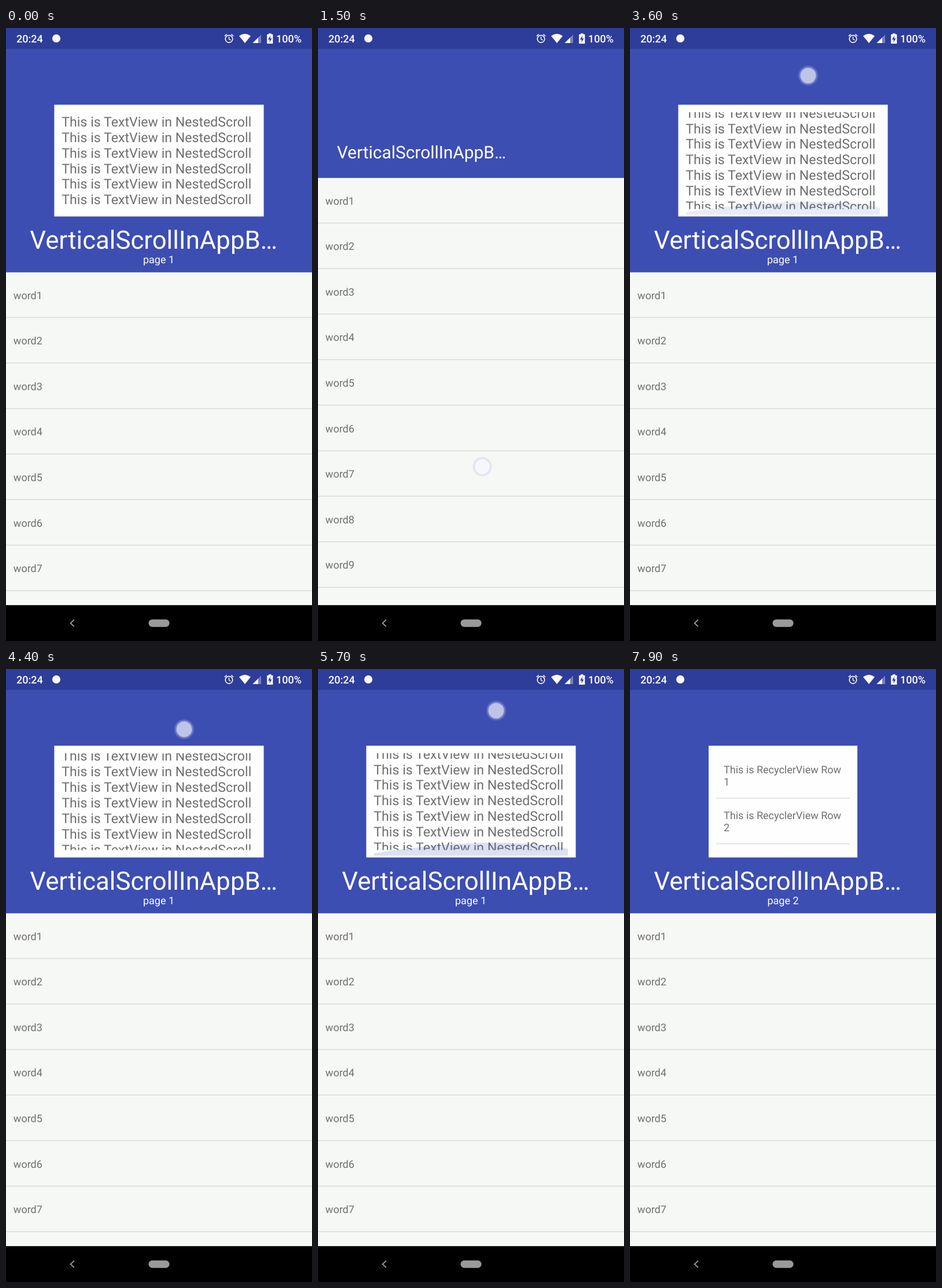
These frames come from a looping animation (529x1058 px, 8000 ms). An HTML page with a canvas:

```html
<!DOCTYPE html>
<html lang="en">
<head>
<meta charset="utf-8">
<title>Vertical scroll in app bar</title>
<style>
  html, body { margin: 0; width: 100%; height: 100%; overflow: hidden; background: #000; }
  canvas { display: block; width: 529px; height: 1058px; }
</style>
</head>
<body>
<canvas id="stage"></canvas>
<script>
const W = 529, H = 1058, LOOP = 8000, STEP = 100, TAU = 2 * Math.PI;
const DP = W / 411.43;
const STATUS = 28 * DP, HEADER = 328 * DP, RANGE = 244 * DP, NAV = H - 48 * DP;
const ROW = 78.6, LINE = 26.94, MAX_SCROLL = 95.9;
const CARD_TOP = STATUS + 75 * DP, CARD_H = 150 * DP, PAD = 10 * DP;
const BLUE = '#3c4eb2', DARK = '#2e3d99', PAPER = '#f6f8f5', CARD = '#fdfefd';
const GREY = '#6e7070', RULE = '#d6d9d6';

const canvas = document.getElementById('stage');
const ctx = canvas.getContext('2d');
const dpr = window.devicePixelRatio || 1;
canvas.width = W * dpr;
canvas.height = H * dpr;

const clamp = (v, lo = 0, hi = 1) => Math.max(lo, Math.min(hi, v));
const ramp = (t, from, to) => clamp((t - from) / (to - from));
const easeOut = x => 1 - (1 - x) ** 2;
const smooth = x => x * x * (3 - 2 * x);

// The header collapses under one drag up and opens again with a drag down.
const headerShift = t => RANGE * (smooth(ramp(t, 400, 1000)) - easeOut(ramp(t, 1400, 1758)));
const scrimAlpha = t => ramp(t, 800, 1200) - ramp(t, 1500, 2100);
const pageShift = t => W * easeOut(ramp(t, 7000, 7850));

// The finger swings up and down over the card, then swipes to the left.
function finger(t) {
  const swing = 180 - 123 * Math.cos(TAU * (t - 4553) / 1063);
  const x = 308 + 157 * smooth(ramp(t, 6300, 6900)) - 325 * smooth(ramp(t, 7000, 7350));
  return { x, y: t < 6335 ? swing : 237 };
}

function rect(x, y, w, h, color) {
  ctx.fillStyle = color;
  ctx.fillRect(x, y, w, h);
}

function disc(x, y, r, color) {
  ctx.fillStyle = color;
  ctx.beginPath();
  ctx.arc(x, y, r, 0, TAU);
  ctx.fill();
}

function poly(points, color) {
  ctx.fillStyle = color;
  ctx.beginPath();
  points.forEach(([x, y]) => ctx.lineTo(x, y));
  ctx.fill();
}

function stroke(points, color, width) {
  ctx.strokeStyle = color;
  ctx.lineWidth = width;
  ctx.beginPath();
  points.forEach(([x, y]) => ctx.lineTo(x, y));
  ctx.stroke();
}

function text(str, x, y, size, color, align = 'left', weight = 400) {
  ctx.font = `${weight} ${size}px Roboto, sans-serif`;
  ctx.textAlign = align;
  ctx.fillStyle = color;
  ctx.fillText(str, x, y);
}

function card(width) {
  rect((W - width) / 2, CARD_TOP, width, CARD_H, CARD);
}

function glow(alpha, base, left, mid, right) {
  ctx.fillStyle = `rgba(63,81,181,${0.17 * clamp(alpha)})`;
  ctx.beginPath();
  ctx.moveTo(97, base);
  ctx.lineTo(97, left);
  ctx.quadraticCurveTo(300, mid, 432, right);
  ctx.lineTo(432, base);
  ctx.fill();
}

function textPage(t) {
  const pull = t < 2900 ? 0 : 196 - finger(t).y;
  const scroll = clamp(pull, 0, MAX_SCROLL);
  const top = CARD_TOP + PAD;
  card(362.2);
  ctx.save();
  ctx.beginPath();
  ctx.rect(96, top, 337, CARD_H - 2 * PAD);
  ctx.clip();
  for (let i = 0; i < 11; i++) {
    text('This is TextView in NestedScroll', 96.3, top + 24.4 + i * LINE - scroll, 18 * DP, GREY);
  }
  ctx.restore();
  glow((pull - MAX_SCROLL) / 28, 322, 318, 286, 310);
  glow(-pull / 100, 144.5, 149, 154, 149);
  text('page 1', W / 2 - 0.5, 406.3, 18, '#fff', 'center');
}

function rowsPage() {
  card(257.2);
  for (let i = 0; i < 2; i++) {
    const y = CARD_TOP + PAD + i * ROW;
    text('This is RecyclerView Row', 162, y + 35, 18, GREY);
    text(i + 1, 162, y + 56, 18, GREY);
    rect(149, y + 77, 231, 1.5, '#dcdedc');
  }
  text('page 2', W / 2, 406.3, 18, '#fff', 'center');
}

function header(t, shift) {
  const bottom = HEADER - shift, page = pageShift(t);
  rect(0, 0, W, bottom, BLUE);
  ctx.save();
  ctx.translate(-page, -shift);
  if (page < W) textPage(t);
  ctx.translate(W, 0);
  if (page > 0) rowsPage();
  ctx.restore();

  ctx.globalAlpha = scrimAlpha(t);
  rect(0, 0, W, bottom, BLUE);
  ctx.globalAlpha = 1;

  const f = shift / RANGE;
  const size = (34 - 14 * easeOut(f)) * DP;
  text('VerticalScrollInAppB…', 41.3 - 16.5 * f, 381 - 300 * f, size, '#fff');
}

function list(top) {
  rect(0, top, W, NAV - top, PAPER);
  for (let i = 0; top + i * ROW < NAV; i++) {
    const y = top + i * ROW;
    text('word' + (i + 1), PAD, y + 45.9, 18, GREY);
    rect(0, y + 77.1, W, 1.4, RULE);
  }
}

function alarmIcon(x, y) {
  ctx.strokeStyle = '#fff';
  ctx.lineWidth = 1.6;
  ctx.beginPath();
  ctx.arc(x, y, 6.3, 0, TAU);
  ctx.stroke();
  stroke([[x, y - 4], [x, y + 0.4], [x + 3, y + 2.2]], '#fff', 1.4);
  for (const side of [-1, 1]) {
    stroke([[x + side * 7.7, y - 4.8], [x + side * 3.9, y - 8]], '#fff', 1.6);
  }
}

function statusBar() {
  rect(0, 0, W, STATUS, DARK);
  text('20:24', 18, 25, 18, '#fff', 'left', 500);
  text('100%', 467, 25, 18, '#fff', 'left', 500);
  disc(87, 18, 7, '#fff');
  alarmIcon(385.5, 18.8);

  // Wi-Fi
  ctx.beginPath();
  ctx.moveTo(413, 26);
  ctx.lineTo(403, 13.7);
  ctx.quadraticCurveTo(413, 6.5, 423, 13.7);
  ctx.fillStyle = '#fff';
  ctx.fill();

  // Signal
  poly([[426.5, 26], [441, 11.5], [441, 26]], 'rgba(255,255,255,.35)');
  poly([[426.5, 26], [436, 16.5], [436, 26]], '#fff');

  // Battery
  rect(451.2, 11, 10.2, 16, '#fff');
  rect(454, 9.3, 4.6, 2, '#fff');
  poly([[457.3, 13], [453, 20], [455.8, 20], [455.3, 25], [459.6, 18], [456.8, 18]], DARK);
}

function navBar() {
  rect(0, NAV, W, H - NAV, '#000');
  stroke([[117.8, 1021.3], [111.6, 1027.2], [117.8, 1033.1]], '#a6a6a6', 1.7);
  ctx.fillStyle = '#9a9a9a';
  ctx.beginPath();
  ctx.roundRect(246.5, 1020.7, 36, 13, 6.5);
  ctx.fill();
}

function touch({ x, y }) {
  const halo = ctx.createRadialGradient(x, y, 12.5, x, y, 18);
  halo.addColorStop(0, 'rgba(195,195,235,0)');
  halo.addColorStop(0.15, 'rgba(195,195,235,.55)');
  halo.addColorStop(1, 'rgba(195,195,235,0)');
  disc(x, y, 18, halo);
  disc(x, y, 13.2, 'rgba(245,246,252,.7)');
}

function render(t) {
  ctx.setTransform(dpr, 0, 0, dpr, 0, 0);
  ctx.textRendering = 'geometricPrecision';
  const shift = headerShift(t);
  header(t, shift);
  list(HEADER - shift);
  statusBar();
  navBar();
  if (t >= 500 && t < 1800) touch({ x: 284, y: 920 - shift });
  if (t >= 2900 && t < 7400) touch(finger(t));
}

const start = performance.now();
function tick() {
  const t = (performance.now() - start) % LOOP;
  render(Math.floor(t / STEP) * STEP);
  requestAnimationFrame(tick);
}
tick();
</script>
</body>
</html>
```
